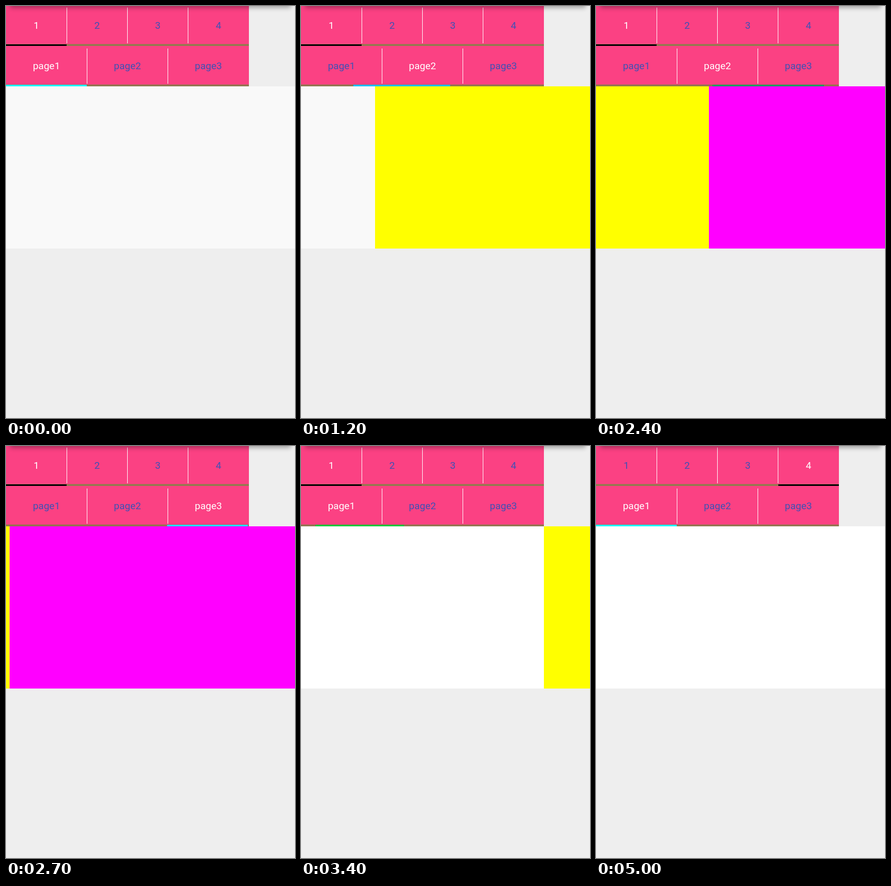
Animation, 558 px wide and 795 px high, one loop 5500 ms. Source, as an HTML page:

```html
<!DOCTYPE html>
<html lang="en">
<head>
<meta charset="utf-8">
<title>Tab strips</title>
<style>
  html, body { margin: 0; width: 100%; height: 100%; overflow: hidden; background: #eee; }
  svg { display: block; width: 558px; height: 795px; }
  text { font: 19px Roboto, sans-serif; text-anchor: middle; }
</style>
</head>
<body>
<svg id="stage" viewBox="0 0 558 795">
  <defs>
    <filter id="blur" filterUnits="userSpaceOnUse" x="-40" y="-60" width="640" height="100">
      <feGaussianBlur stdDeviation="5"/>
    </filter>
  </defs>
</svg>
<script>
const LOOP = 5500, STEP = 100, W = 558, STRIP = 469;
const CYAN = [0, 255, 255], BLUE = [0, 0, 255], GREEN = [0, 255, 0];
const PALETTE = [CYAN, BLUE, GREEN];
const stage = document.getElementById('stage');

function add(tag, attrs, label) {
  const el = document.createElementNS('http://www.w3.org/2000/svg', tag);
  set(el, attrs);
  if (label) el.textContent = label;
  return stage.appendChild(el);
}

function set(el, attrs) {
  for (const key in attrs) el.setAttribute(key, attrs[key]);
}

const rect = (x, y, width, height, fill) => add('rect', { x, y, width, height, fill });

function makeStrip(labels, top, bottom, track, bars) {
  const cell = STRIP / labels.length;
  rect(0, top, STRIP, bottom - top, '#fb4183');
  rect(0, bottom - 3.5, STRIP, 3.5, track);
  const texts = labels.map((label, i) => {
    if (i) rect(Math.floor(cell * i), bars[0], 1, bars[1] - bars[0], '#fff');
    return add('text', { x: cell * (i + .5), y: bottom - 32.7 }, label);
  });
  const line = rect(0, bottom - 3, cell, 3, '#000');
  return { cell, texts, line };
}

function drawStrip(strip, selected, center, stretch, color) {
  strip.texts.forEach((t, i) => set(t, { fill: i === selected ? '#fff' : '#3f51b5' }));
  const left = Math.round(strip.cell * (center - stretch / 2));
  const right = Math.round(strip.cell * (center + 1 + stretch / 2));
  set(strip.line, { x: left, width: right - left, fill: color });
}

// Remaining share of a scroll with a quintic slow-down
function remain(t, start, duration) {
  const k = Math.min(1, Math.max(0, (t - start) / duration));
  return (1 - k) ** 5;
}

function mix(u) {
  const i = Math.min(1, Math.floor(u));
  const rgb = PALETTE[i].map((v, n) => Math.round(v + (PALETTE[i + 1][n] - v) * (u - i)));
  return `rgb(${rgb})`;
}

// Scroll position, line centre, colour position and stretch sharpness
function pagerAt(t) {
  let pos, center, hue, power = 1.36;
  if (t < 500) {
    pos = center = hue = 0;
  } else if (t < 1200) {
    const k = (t - 500) / 100;
    pos = .1 + .097 * k;
    center = hue = .038 + .106 * k;
  } else if (t < 1900) {
    pos = center = 1 - .303 * remain(t, 1180, 600);
    hue = 1 - center;
    power = 2.67;
  } else if (t < 2500) {
    const k = (t - 1900) / 100;
    pos = 1.102 + .1016 * k;
    center = hue = 1.038 + .1178 * k;
  } else if (t < 3200) {
    pos = center = 2 - .39 * remain(t, 2400, 600);
    hue = Math.max(.1, 2 - center);
    power = 2.67;
  } else {
    const rest = remain(t, 3281, 300);
    pos = 2 * rest;
    center = 2 * rest ** .865;
    hue = center < .02 ? 0 : Math.max(.1, 2 - center);
    power = 4.2;
  }
  const f = center % 1;
  const selected = t < 1200 || t >= 3200 ? 0 : t < 2500 ? 1 : 2;
  return { pos, center, selected, color: mix(hue), stretch: .41 * (4 * f * (1 - f)) ** power };
}

const pages = ['#f9f9f9', '#ff0', '#f0f'].map(fill => rect(0, 155, W, 313, fill));
const upper = makeStrip(['1', '2', '3', '4'], 0, 77, '#8e7d4c', [3, 72]);
const lower = makeStrip(['page1', 'page2', 'page3'], 77, 155, '#94744f', [82, 150]);
set(rect(8, -34, W - 16, 37, '#000'), { opacity: .36, filter: 'url(#blur)' });

const taps = [3800, 4300, 4700];

function draw(time) {
  const t = Math.floor(time % LOOP / STEP) * STEP;

  const pager = pagerAt(t);
  pages.forEach((page, i) => set(page, { x: Math.round(W * (i - pager.pos) + .2) }));
  set(pages[0], { fill: t < 3300 ? '#f9f9f9' : '#fff' });
  drawStrip(lower, pager.selected, pager.center, pager.stretch, pager.color);

  const tab = taps.filter(tap => t >= tap).length;
  const place = taps.reduce((sum, tap) => sum + 1 - remain(t, tap + 98.4, 200), 0);
  drawStrip(upper, tab, place, 0, '#000');
}

const began = performance.now();
function tick() {
  draw(performance.now() - began);
  requestAnimationFrame(tick);
}
tick();
</script>
</body>
</html>
```
